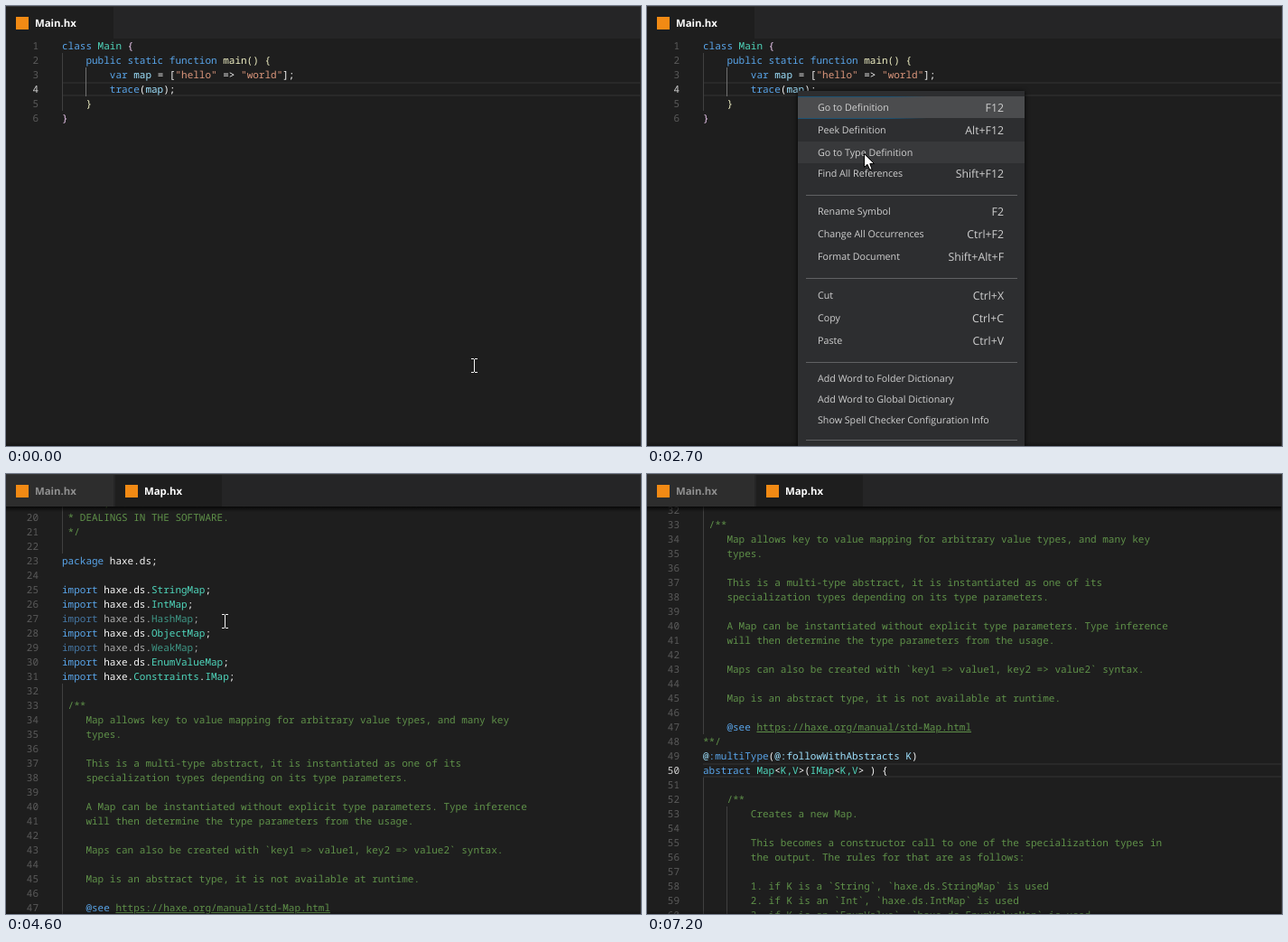
Write an HTML page that moves like this. It is 703 px wide and 487 px high and loops after 7900 ms.

```html
<!DOCTYPE html>
<html lang="en">
<head>
<meta charset="utf-8">
<title>Go to Type Definition</title>
<style>
html, body { margin: 0; width: 100%; height: 100%; overflow: hidden; background: #1e1e1e; }
body { position: relative; text-rendering: geometricPrecision; }
div, i, svg { position: absolute; }
#stage { width: 703px; height: 487px; overflow: hidden; }
#bar { width: 703px; height: 36px; background: #252526; }
#bar::after { content: ""; position: absolute; width: 703px; height: 1px; background: #353535; }
.tab { top: 0; height: 36px; font: 700 11.4px/40px "Open Sans", "Noto Sans", sans-serif; color: #909090; background: #2d2d2d; }
.tab.on { color: #fff; background: #1e1e1e; }
.tab i { left: 11px; top: 12px; width: 14px; height: 14px; background: #f28a14; }
.tab span { position: absolute; left: 32px; }
#view { top: 36px; width: 703px; height: 451px; overflow: hidden; }
#view::after { content: ""; position: absolute; left: 0; bottom: 0; width: 703px; height: 5px; background: linear-gradient(#0000, #0004); }
.file { width: 703px; font: 500 11px/18px "Noto Sans Mono", "DejaVu Sans Mono", monospace; }
.row { left: 62px; height: 16px; white-space: pre; }
.num { left: 0; width: 36px; text-align: right; color: #5a5a5a; }
.num.on { color: #d0d0d0; }
.now { left: 62px; width: 641px; height: 16px; box-sizing: border-box; border: solid #292929; border-width: 2px 0; }
.guide { width: 1px; background: #404040; }
.dim { opacity: .65; }
.k { color: #59a5ea; } .t { color: #4fd6bc; } .w { color: #f8f8f8; } .v { color: #9fe2ff; }
.s { color: #dc977c; } .c { color: #5f9149; } .f { color: #f0f0c4; } .p { color: #f2cdf6; }
.u { color: #5f9149; text-decoration: underline; text-underline-offset: 1px; }
.plain span { color: #d4d4d4; }
#shade { top: 36px; width: 703px; height: 6px; background: linear-gradient(#000b, #0000); }
#edge { left: 702px; top: 0; width: 1px; height: 487px; background: #303030; }
.caret { width: 2px; height: 16px; background: #d0d0d0; }
#menu { left: 167px; top: 94px; width: 251px; height: 420px; background: #2d2e30; box-shadow: 0 1px 5px #000;
  font: 10.7px/26px "Open Sans", "Noto Sans", sans-serif; color: #d0d0d0; }
.item { left: 0; width: 251px; height: 24px; }
.item span { position: absolute; left: 22px; white-space: pre; }
.item b { position: absolute; right: 23px; font-weight: 400; font-size: 12.3px; }
.item.focus { background: #4b4c4e; }
.item.focus::before { content: ""; position: absolute; width: 143px; height: 23px; border: solid #1d5273; border-width: 1px 0;
  -webkit-mask: linear-gradient(90deg, #000 70%, #0000); mask: linear-gradient(90deg, #000 70%, #0000); }
.item.hover { background: #38393b; }
.sep { left: 9px; width: 234px; height: 1px; background: #606163; }
svg { left: 0; top: 0; overflow: visible; }
</style>
</head>
<body>
<div id="stage">
  <div id="view"></div>
  <div id="shade"></div>
  <div id="bar"></div>
  <div id="edge"></div>
  <div id="menu"></div>
  <svg id="beam" width="1" height="1"><path d="M-3 -7.5H0M1 -7.5H4M-3 7.5H0M1 7.5H4M.5 -7V7" stroke="#f4f4f4" fill="none"/></svg>
  <svg id="arrow" width="1" height="1"><path d="M.5 .5V15.5L4 12.3L6.6 18H9.2L6.8 11.6H11.6Z" fill="#fff" stroke="#000"/></svg>
</div>
<script>
const LOOP = 7900, ROW = 16, COL = 6.6;
const $ = id => document.getElementById(id);

function add(parent, cls, style = {}, html = "") {
  const el = document.createElement("div");
  el.className = cls;
  for (const key in style) el.style[key] = typeof style[key] === "number" ? style[key] + "px" : style[key];
  el.innerHTML = html;
  parent.append(el);
  return el;
}

// Each § starts a token, its first letter is the colour class; lines without § are comments.
const mainCode = `§kclass §tMain §p{
§w    §kpublic static function §fmain() {
§w        §kvar §vmap §w= [§s"hello" §w=> §s"world"§w];
§w        §ktrace§w(§vmap§w);
§f    }
§p}`;

const imports = ["String", "Int", "Hash", "Object", "Weak", "EnumValue"]
  .map(n => `§kimport §whaxe.ds.§t${n}Map§w;`).join("\n");

const mapCode = `/*
 * Copyright (C)2005-2017 Haxe Foundation
 *
 * Permission is hereby granted, free of charge, to any person obtaining a
 * copy of this software and associated documentation files (the "Software"),
 * to deal in the Software without restriction, including without limitation
 * the rights to use, copy, modify, merge, publish, distribute, sublicense,
 * and/or sell copies of the Software, and to permit persons to whom the
 * Software is furnished to do so, subject to the following conditions:
 *
 * The above copyright notice and this permission notice shall be included in
 * all copies or substantial portions of the Software.
 *
 * THE SOFTWARE IS PROVIDED "AS IS", WITHOUT WARRANTY OF ANY KIND, EXPRESS OR
 * IMPLIED, INCLUDING BUT NOT LIMITED TO THE WARRANTIES OF MERCHANTABILITY,
 * FITNESS FOR A PARTICULAR PURPOSE AND NONINFRINGEMENT. IN NO EVENT SHALL THE
 * AUTHORS OR COPYRIGHT HOLDERS BE LIABLE FOR ANY CLAIM, DAMAGES OR OTHER
 * LIABILITY, WHETHER IN AN ACTION OF CONTRACT, TORT OR OTHERWISE, ARISING
 * FROM, OUT OF OR IN CONNECTION WITH THE SOFTWARE OR THE USE OR OTHER
 * DEALINGS IN THE SOFTWARE.
 */

§kpackage §whaxe.ds;

${imports}
§kimport §whaxe.§tConstraints§w.§tIMap§w;

 /**
    Map allows key to value mapping for arbitrary value types, and many key
    types.

    This is a multi-type abstract, it is instantiated as one of its
    specialization types depending on its type parameters.

    A Map can be instantiated without explicit type parameters. Type inference
    will then determine the type parameters from the usage.

    Maps can also be created with \`key1 => value1, key2 => value2\` syntax.

    Map is an abstract type, it is not available at runtime.

§c    §k@see§c §uhttps://haxe.org/manual/std-Map.html
**/
§v@§k:multiType§w(§v@:followWithAbstracts K§w)
§kabstract §tMap§w<§tK,V§w>(§tIMap§w<§tK,V§w> ) {

    /**
        Creates a new Map.

        This becomes a constructor call to one of the specialization types in
        the output. The rules for that are as follows:

        1. if K is a \`String\`, \`haxe.ds.StringMap\` is used
        2. if K is an \`Int\`, \`haxe.ds.IntMap\` is used
        3. if K is an \`EnumValue\`, \`haxe.ds.EnumValueMap\` is used`;

const esc = s => s.replace(/&/g, "&amp;").replace(/</g, "&lt;");

function paint(line) {
  const tokens = line[0] === "§" ? line.slice(1).split("§") : ["c" + line];
  return tokens.map(s => `<span class="${s[0]}">${esc(s.slice(1))}</span>`).join("");
}

// guides: [column, first line, last line, colour]
function makeFile(code, current, col, guides, dimmed = []) {
  const file = add($("view"), "file");
  add(file, "now", { top: (current - 1) * ROW });
  for (const [c, from, to, color] of guides)
    add(file, "guide", { left: 62 + Math.floor(c * COL), top: (from - 1) * ROW, height: (to - from + 1) * ROW, background: color || "#404040" });
  code.split("\n").forEach((line, i) => {
    const n = i + 1, top = i * ROW;
    add(file, n === current ? "num on" : "num", { top }, n);
    add(file, dimmed.includes(n) ? "row dim" : "row", { top }, paint(line));
  });
  const caret = add(file, "caret", { left: 62 + Math.floor(col * COL), top: (current - 1) * ROW });
  return { file, caret };
}

const main = makeFile(mainCode, 4, 16.1, [[0, 2, 5], [4, 3, 4, "#707070"]]);
const map = makeFile(mapCode, 50, 9, [[0, 2, 22], [0, 32, 47], [0, 51, 60], [4, 53, 60]], [27, 29]);

function makeTab(left, width, name) {
  return add($("bar"), "tab", { left, width }, `<i></i><span>${name}</span>`);
}
const mainTab = makeTab(0, 119, "Main.hx");
const mapTab = makeTab(121, 118, "Map.hx");

const items = [
  [112, "Go to Definition", "F12"], [137, "Peek Definition", "Alt+F12"],
  [162, "Go to Type Definition", ""], [185, "Find All References", "Shift+F12"],
  [227, "Rename Symbol", "F2"], [252, "Change All Occurrences", "Ctrl+F2"],
  [277, "Format Document", "Shift+Alt+F"],
  [320, "Cut", "Ctrl+X"], [345, "Copy", "Ctrl+C"], [370, "Paste", "Ctrl+V"],
  [412, "Add Word to Folder Dictionary", ""], [435, "Add Word to Global Dictionary", ""],
  [458, "Show Spell Checker Configuration Info", ""]
].map(([y, label, key]) => add($("menu"), "item", { top: y - 106 }, `<span>${label}</span><b>${key}</b>`));
for (const y of [209, 301, 394, 480]) add($("menu"), "sep", { top: y - 94 });

// Pointer moves: start, steps, from, to
const moves = [
  [100, 8, [518, 398], [183, 162]],
  [900, 6, [183, 162], [169, 94]],
  [2300, 5, [169, 94], [240, 163]],
  [3400, 1, [240, 163], [242, 163]],
  [5800, 6, [242, 163], [13, 425]]
];
const scrolls = [[0, 0], [4600, 300], [4700, 400], [4800, 450], [5400, 500]];
const blinks = [[0, 0], [4700, 1], [5200, 0], [5600, 1], [6100, 0], [6700, 1], [7200, 0]];

const last = (table, t) => table.filter(r => r[0] <= t).pop();
const ease = k => (1 - Math.cos(Math.PI * k)) / 2;
const show = (el, on) => { el.style.visibility = on ? "visible" : "hidden"; };

function pointer(t) {
  const move = last(moves, t);
  if (!move) return moves[0][2];
  const [start, steps, a, b] = move;
  const k = ease(Math.min(1, ((t - start) / 100 + 1) / steps));
  return a.map((v, i) => Math.round(v + (b[i] - v) * k));
}

function render(ms) {
  const t = Math.floor(ms / 100) * 100;
  const inMap = t >= 3800, menuOpen = t >= 1700 && t < 3400;
  const [x, y] = pointer(t);

  main.file.style.display = inMap ? "none" : "block";
  map.file.style.display = inMap ? "block" : "none";
  map.file.classList.toggle("plain", t < 3900);
  map.file.style.top = -last(scrolls, t)[1] + "px";
  show(main.caret, t >= 3400);
  show(map.caret, last(blinks, t)[1]);
  show($("shade"), t >= 4600);

  mainTab.classList.toggle("on", t < 3600);
  mapTab.classList.toggle("on", t >= 3600);
  show(mapTab, t >= 3600);

  show($("menu"), menuOpen);
  $("menu").style.opacity = t < 1800 ? .6 : 1;
  items[0].classList.toggle("focus", t >= 2300);
  [1, 2].forEach(i => items[i].classList.toggle("hover", t >= 2300 && y >= 100 + i * 25 && y < 125 + i * 25));

  const asArrow = (t >= 2300 && t < 3400) || (t >= 5800 && x < 60);
  const visible = t < 6400;
  show($("arrow"), visible && asArrow);
  show($("beam"), visible && !asArrow);
  for (const id of ["arrow", "beam"]) $(id).style.transform = `translate(${x}px, ${y}px)`;
}

function tick() {
  render(performance.now() % LOOP);
  requestAnimationFrame(tick);
}
tick();
</script>
</body>
</html>
```
